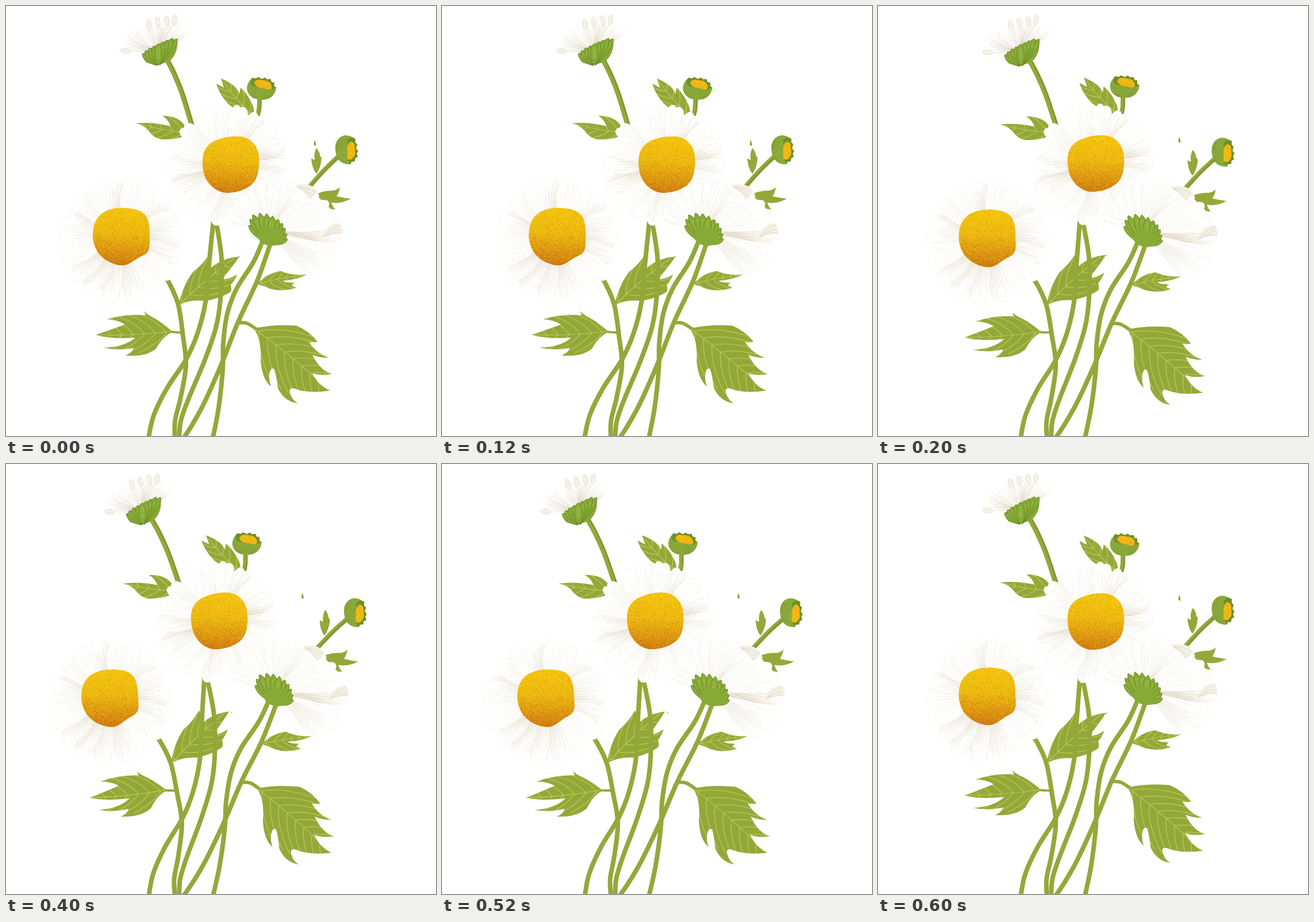
Animation, 748 px wide and 748 px high, one loop 800 ms. Source, as an HTML page with a canvas:

```html
<!DOCTYPE html>
<html lang="en">
<head>
<meta charset="utf-8">
<title>Swaying daisies</title>
<style>
html, body { margin: 0; height: 100%; overflow: hidden; background: #fff; }
canvas { display: block; width: 100vw; height: 100vh; }
</style>
</head>
<body>
<canvas id="stage" width="748" height="748"></canvas>
<script>
const c = document.getElementById('stage').getContext('2d');
const GREEN = '#94a83a', VEIN = '#b7cd52', CUP = '#87a936', EDGE = '#668522', LIGHT = '#b4cb55';
const rad = deg => deg * Math.PI / 180;
let seed = 1;
const rnd = () => (seed = seed * 16807 % 2147483647) / 2147483647;

function fill(path, color) {
  c.fillStyle = color;
  c.fill(path);
}

function line(path, color, width) {
  c.strokeStyle = color;
  c.lineWidth = width;
  c.stroke(path);
}

// Smooth curve through a flat list of x, y pairs.
function spline(xy, closed) {
  const n = xy.length / 2, path = new Path2D();
  const at = i => {
    i = closed ? (i + n) % n : Math.max(0, Math.min(n - 1, i));
    return [xy[2 * i], xy[2 * i + 1]];
  };
  path.moveTo(...at(0));
  for (let i = 0; i < (closed ? n : n - 1); i++) {
    const [a, b, d, e] = [at(i - 1), at(i), at(i + 1), at(i + 2)];
    path.bezierCurveTo(b[0] + (d[0] - a[0]) / 6, b[1] + (d[1] - a[1]) / 6,
      d[0] - (e[0] - b[0]) / 6, d[1] - (e[1] - b[1]) / 6, ...d);
  }
  return path;
}

function stem(xy, width = 8, shaded = false) {
  const path = spline(xy);
  line(path, GREEN, width);
  if (shaded) {
    c.save();
    c.translate(2.8, -1);
    line(path, '#7d9131', 2);
    c.restore();
  }
}

function leaf(d, x0, y0, x1, y1, veins = 0, reach = 50) {
  const path = new Path2D(d);
  fill(path, GREEN);
  if (!veins) return;
  c.save();
  c.clip(path);
  const len = Math.hypot(x1 - x0, y1 - y0);
  c.translate(x0, y0);
  c.rotate(Math.atan2(y1 - y0, x1 - x0));
  const rib = new Path2D(`M0 0Q${len / 2} -5 ${len} 0`);
  for (let i = 0; i < veins; i++) {
    const x = len * (i + .4) / (veins + .6), out = reach * (1 - .45 * i / veins);
    for (const s of [-1, 1]) {
      rib.moveTo(x, -2);
      rib.quadraticCurveTo(x + out * .35, s * out * .45, x + out * 1.05, s * out * .72);
    }
  }
  line(rib, VEIN, 1.2);
  c.restore();
}

function petal(x, y, angle, r, len, w, shade) {
  c.save();
  c.translate(x, y);
  c.rotate(rad(angle));
  const path = new Path2D(`M${r} ${-w * .2}C${len * .55} ${-w * .48} ${len * .85} ${-w * .62} ${len} ${-w * .3}` +
    `Q${len * 1.03} ${-w * .1} ${len * .98} 0Q${len * 1.02} ${w * .2} ${len * .96} ${w * .36}` +
    `C${len * .85} ${w * .6} ${len * .55} ${w * .46} ${r} ${w * .2}Z`);
  fill(path, '#fffefd');
  line(path, 'rgba(222,216,198,.22)', .8);
  c.clip(path);
  if (shade) {
    const g = c.createLinearGradient(len * .6, w * .5, len * .72, -w * .35);
    g.addColorStop(0, `rgba(214,205,174,${shade * .17})`);
    g.addColorStop(.45, `rgba(236,230,213,${shade * .13})`);
    g.addColorStop(1, 'rgba(255,255,255,0)');
    fill(path, g);
  }
  for (let i = -3; i <= 3; i++) {
    const v = i / 3, end = len * (.62 + .34 * rnd());
    line(new Path2D(`M${r} ${v * w * .18}Q${len * .65} ${v * w * .48} ${end} ${v * w * .42}`),
      `rgba(192,182,152,${.08 + .16 * rnd() + shade * .06})`, .8);
  }
  c.restore();
}

function disc(xy) {
  const path = spline(xy, true);
  const [x, y] = [xy[0], xy[1]];
  c.save();
  c.clip(path);
  const g = c.createLinearGradient(x + 8, y, x, y + 98);
  g.addColorStop(0, '#f3c60e');
  g.addColorStop(.45, '#ecb90f');
  g.addColorStop(.75, '#de9a12');
  g.addColorStop(1, '#cf7c12');
  fill(path, g);
  for (let i = 0; i < 3200; i++) {
    const u = rnd(), v = rnd(), dark = rnd() < v * v * .75;
    c.fillStyle = dark ? 'rgba(190,96,14,.42)' : rnd() < .5 ? 'rgba(255,216,48,.4)' : 'rgba(222,158,8,.35)';
    c.fillRect(x - 54 + u * 108, y - 4 + v * 108, 1.3, 1.3);
  }
  c.restore();
}

function daisy(x, y, shades, reach) {
  [...shades].forEach((s, i) => {
    const a = i * 360 / shades.length;
    const len = reach(rad(a)) + 5 * rnd() - 3;
    petal(x, y, a + 4 * rnd() - 2, 40, len, 34, +s);
  });
}

// Sepals spreading from a base point to each tip.
function cup(bx, by, tips, w) {
  for (let i = 0; i < tips.length; i += 2) {
    const len = Math.hypot(tips[i] - bx, tips[i + 1] - by);
    c.save();
    c.translate(bx, by);
    c.rotate(Math.atan2(tips[i + 1] - by, tips[i] - bx));
    const path = new Path2D(`M0 -3C${len * .45} ${-w} ${len * .85} ${-w * .9} ${len} 0` +
      `C${len * .85} ${w * .9} ${len * .45} ${w} 0 3Z`);
    fill(path, CUP);
    line(path, EDGE, .8);
    line(new Path2D(`M${len * .25} -1.5L${len * .82} -1.8M${len * .25} 1.5L${len * .82} 1.8`), LIGHT, .8);
    c.restore();
  }
}

function bud(x, y, angle) {
  c.save();
  c.translate(x, y);
  c.rotate(rad(angle));
  const body = new Path2D('M-25 0C-25 -8 -20 -14 -17 -18L-10 -17L-7 -20L0 -17L5 -20L9 -17' +
    'L15 -18L17 -13L22 -12L22 -6L26 -4C25 12 14 19 0 19S-24 12 -25 0Z');
  fill(body, CUP);
  fill(new Path2D('M-20 -10L-17 -18L-10 -17L-7 -20L0 -17L5 -20L9 -17L15 -18L17 -13L22 -12L22 -6L26 -4L17 0L-16 -4Z'), '#6f8f2a');
  const ribs = new Path2D();
  for (let i = -5; i <= 5; i++) {
    ribs.moveTo(i * 4.4, 1 - Math.abs(i) * .4);
    ribs.quadraticCurveTo(i * 4.5, 10, i * 2.2, 17);
  }
  line(ribs, EDGE, 1.8);
  line(ribs, LIGHT, .9);
  const heart = new Path2D('M-13 -10C-9 -18 -2 -15 4 -15C12 -15 19 -9 18 -4C18 2 11 0 4 -1C-4 -2 -11 -3 -13 -10Z');
  fill(heart, '#f0b713');
  c.clip(heart);
  for (let i = 0; i < 130; i++) {
    c.fillStyle = rnd() < .5 ? 'rgba(255,216,40,.5)' : 'rgba(222,140,14,.4)';
    c.fillRect(-14 + 33 * rnd(), -16 + 18 * rnd(), 1.3, 1.3);
  }
  c.restore();
}

function leftPlant() {
  stem([268, 458, 285, 484, 300, 521, 308, 575, 313, 625, 304, 680, 294, 722, 294, 756]);
  stem([304, 568, 290, 567, 274, 565], 4);
  leaf('M290 567Q272 551 258 543Q246 537 240 531L243 538Q208 535 176 545Q195 546 207 554Q180 564 156 572' +
    'Q183 580 225 577Q205 594 170 594Q193 600 222 595Q221 602 208 608Q243 611 261 596Q273 574 290 567Z',
    287, 566, 160, 572, 6, 48);
  leaf('M300 521Q307 487 325 463Q344 448 354 431Q360 444 355 457Q375 438 406 436Q393 455 375 476' +
    'Q390 475 402 467Q397 479 391 485Q393 494 391 497Q375 508 346 513Q318 510 300 521Z', 301, 520, 397, 439, 6, 48);
  daisy(201, 401, '320022330121030031', a => 108 + 6 * Math.sin(a));
  disc([200, 351, 232, 356, 247, 372, 250, 402, 247, 427, 229, 439, 206, 451, 181, 446, 160, 429, 151, 402, 156, 374, 173, 357]);
}

function tallPlant() {
  stem([361, 372, 354, 440, 347, 515, 333, 570, 313, 615, 280, 665, 257, 712, 247, 756]);
  stem([365, 372, 375, 440, 373, 510, 365, 560, 345, 618, 318, 682, 304, 722, 301, 756]);
  fill(new Path2D('M405 434L407 436L405 437Z'), GREEN);
  fill(new Path2D('M537 233Q540 239 539 244L535 241Z'), GREEN);

  stem([281, 95, 293, 119, 307, 154, 324, 210], 9, true);
  stem([441, 160, 440, 180, 436, 196], 8, true);
  leaf('M374 126Q402 138 406 153L408 142Q422 154 430 175Q433 187 431 194Q402 184 386 170Q370 152 366 135L379 142Z',
    430, 190, 378, 132, 4, 30);
  leaf('M226 204Q253 201 286 209Q283 198 272 191Q302 191 313 211L318 222Q302 233 270 232Q257 230 248 217Q240 207 226 204Z',
    316, 220, 232, 205, 4, 32);

  const top = [-172, 64, 2, -160, 66, 3, -148, 60, 2, -134, 52, 0, -122, 52, 1, -111, 52, 2, -98, 54, 1,
    -86, 60, 2, -77, 62, 3, -66, 62, 2, -52, 58, 1, -39, 62, 2];
  for (let i = 0; i < top.length; i += 3) petal(268, 78, top[i], 5, top[i + 1], 16, top[i + 2]);
  for (const [x, y, a] of [[208, 78, 8], [249, 32, 80], [280, 26, 82], [293, 24, 100], [264, 28, 80]]) {
    const tip = new Path2D();
    tip.ellipse(x, y, 9, 4, rad(a), 0, 7);
    fill(tip, 'rgba(243,238,222,.75)');
    line(tip, 'rgba(205,195,163,.55)', .8);
  }
  fill(new Path2D('M238 84Q268 60 298 58Q300 83 284 96Q262 106 244 98Q238 93 238 84Z'), CUP);
  cup(265, 101, [237, 83, 298, 57, 242, 78, 290, 56, 249, 73, 281, 59, 257, 69, 273, 62, 265, 65], 9);

  daisy(391, 276, '200102103201010303', a => 105 - 5 * Math.cos(a) + 3 * Math.sin(a));
  disc([391, 227, 419, 230, 437, 249, 440, 280, 431, 307, 406, 322, 376, 324, 354, 310, 343, 286, 344, 255, 360, 236]);
  bud(444, 144, 4);
}

function rightPlant() {
  stem([446, 410, 430, 446, 401, 492, 385, 535, 378, 585, 377, 632, 370, 698, 359, 756]);
  stem([461, 410, 437, 478, 404, 549, 376, 620, 345, 690, 323, 730, 306, 756]);
  stem([402, 551, 419, 552, 437, 563], 6);
  stem([430, 487, 437, 483, 446, 481], 4);
  leaf('M431 561Q467 553 505 556Q527 565 542 584Q532 586 527 584Q539 604 562 612Q546 612 533 607Q546 634 567 640' +
    'Q549 644 533 639Q543 660 564 669Q525 675 500 665Q490 664 495 676Q499 687 508 691Q485 689 473 665' +
    'Q470 640 466 631Q460 628 458 640Q457 652 461 662Q446 650 443 618Q445 580 431 561Z', 433, 562, 560, 667, 8, 76);
  leaf('M437 484Q453 465 478 461Q500 470 523 467Q508 476 481 478Q488 482 502 481L497 486L505 490Q481 498 460 492Q449 487 437 484Z',
    438, 484, 518, 469, 5, 30);

  stem([578, 262, 554, 285, 528, 314], 8, true);
  leaf('M540 247Q546 254 546 260L549 264Q548 281 540 292Q532 282 531 265L537 268Q535 256 540 247Z');
  leaf('M537 329Q549 321 570 321Q577 319 581 315Q579 326 575 331Q588 334 600 335Q583 345 566 342Q568 349 573 354Q550 352 540 347Z');

  const fan = [-156, 82, 2, -142, 76, 1, -128, 76, 0, 42, 112, 1, -112, 80, 1, -98, 86, 0, 30, 122, 1,
    -84, 84, 1, 17, 112, 0, -70, 88, 0, -58, 92, 1, 4, 124, 3, -45, 96, 3, -9, 112, 0, -33, 100, 0, -21, 108, 0];
  for (let i = 0; i < fan.length; i += 3) petal(462, 387, fan[i], 12, fan[i + 1], 36, fan[i + 2]);
  for (const [x, y, a] of [[524, 321, 42], [569, 391, -12]]) {
    c.save();
    c.translate(x, y);
    c.rotate(rad(a));
    fill(new Path2D('M-22 8Q-8 -15 13 -11Q18 -3 14 9Q4 4 -22 8Z'), '#f4f0e5');
    line(new Path2D('M-18 7Q-2 -7 13 -7M-18 7Q0 -2 14 0M-18 7Q2 2 13 6'), '#ded6c2', .8);
    c.restore();
  }
  cup(458, 411, [422, 382, 490, 406, 424, 371, 489, 397, 429, 363, 486, 387, 441, 360, 481, 378, 474, 371, 453, 361, 464, 365], 9);
  fill(spline([438, 398, 451, 386, 471, 390, 481, 403, 480, 413, 460, 417, 444, 411], true), CUP);
  bud(592, 250, 82);
}

const plants = [
  [leftPlant, 300, [0, -1.73, -3.3]],
  [tallPlant, 312, [0, -1.46, -2.4]],
  [rightPlant, 326, [0, .88, 1.75]]
];

function draw(pose) {
  seed = 4217;
  c.fillStyle = '#fff';
  c.fillRect(0, 0, 748, 748);
  for (const [paint, x, angles] of plants) {
    c.save();
    c.translate(x, 748);
    c.rotate(rad(angles[pose]));
    c.translate(-x, -748);
    paint();
    c.restore();
  }
}

let shown = -1;
function tick() {
  const pose = [0, 1, 2, 1][Math.floor(performance.now() / 200) % 4];
  if (pose !== shown) draw(shown = pose);
  requestAnimationFrame(tick);
}
tick();
</script>
</body>
</html>
```
